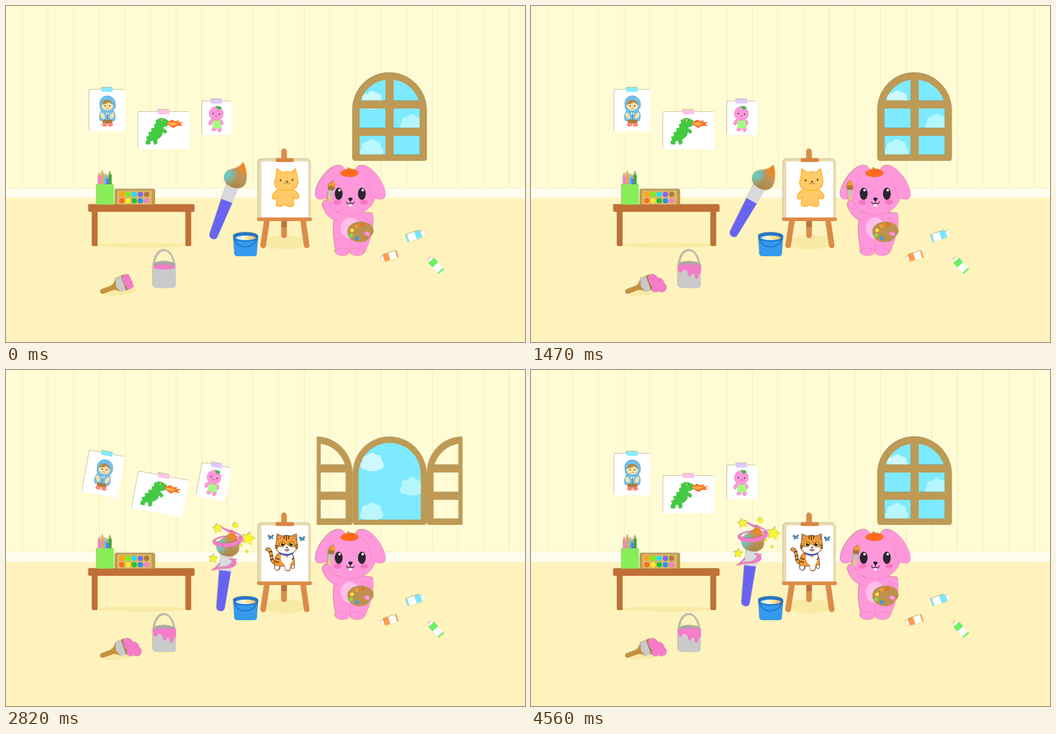
An HTML page that plays this animation: 929 by 603 pixels, repeating every 4.59 s.

```html
<!DOCTYPE html>
<html lang="en">
<head>
<meta charset="utf-8">
<title>Art room</title>
<style>
html,body{margin:0;width:100%;height:100%;overflow:hidden;background:#fffbd5}
svg{display:block;width:100vw;height:100vh}
.s{filter:drop-shadow(-1px -.3px .5px rgba(100,90,40,.38))}
.line{fill:none;stroke-linecap:round;stroke-linejoin:round}
.pink{fill:#ff98da;stroke:#ef7cc6;stroke-width:.8}
.dark{stroke:#2b2430}
</style>
</head>
<body>
<svg viewBox="0 0 929 603" preserveAspectRatio="none">
<defs>
  <linearGradient id="tuft" x1=".7" y1="0" x2=".5" y2="1">
    <stop offset="0" stop-color="#ff7a12"/><stop offset=".28" stop-color="#e88b2c"/>
    <stop offset=".5" stop-color="#bd965c"/><stop offset="1" stop-color="#ab8443"/>
  </linearGradient>
  <radialGradient id="teal" cx=".1" cy=".62" r=".52">
    <stop offset="0" stop-color="#4fd6d8"/><stop offset=".45" stop-color="#7dbcae" stop-opacity=".85"/>
    <stop offset="1" stop-color="#a89a66" stop-opacity="0"/>
  </radialGradient>
  <linearGradient id="water">
    <stop offset="0" stop-color="#9fdcf0"/><stop offset=".35" stop-color="#fff8d8"/>
    <stop offset=".75" stop-color="#ffd68a"/><stop offset="1" stop-color="#e9b060"/>
  </linearGradient>
  <clipPath id="opening"><path id="hole" d="M631 187A55.5 56 0 0 1 742.5 187V268.5H631Z"/></clipPath>
  <path id="door" fill="#be9a55" fill-rule="evenodd" d="M66.5 120A66.5 67 0 0 0 0 187V273Q0 278 5 278H66.5ZM59.5 132.5A55 55 0 0 0 14 170H59.5ZM12.5 184H59.5V219H12.5ZM12.5 233H59.5V267H12.5Z"/>
  <g id="cloud"><circle cy="-8" r="9"/><circle cx="-10" cy="-4" r="8"/><circle cx="9" cy="-5" r="8"/><circle cx="-13" cy="6" r="8"/><circle cx="13" cy="5" r="8"/><circle cx="-3" cy="6" r="10.5"/><circle cx="6" cy="7" r="9"/></g>
  <path id="ear" d="M607 295C604 284 591 283 578 294C564 306 553 327 554 340C555 349 567 348 575 343C581 339 581 328 583 320C586 310 592 302 600 298"/>
  <g id="tube">
    <rect x="-16" y="-7" width="18" height="14" rx="1" fill="#fff"/>
    <path d="M-16.500-7H-13.500V7H-16.500ZM0-7H9Q11-6 11 0Q11 6 9 7H0Z"/>
    <rect x="11" y="-4" width="5" height="8" rx="1" fill="#fff"/>
  </g>
  <g id="fly" fill="#4d93bd" stroke="#27587a" stroke-width=".7"><path d="M0 0C-6-7-7 1-2 2C-6 5-1 7 0 2C4 6 6 3 2 1C7-1 5-7 0 0Z"/></g>
  <path id="tip" d="M-11-26C-23-33-23-46-13-53C-5-59 0-63 3-73C11-66 21-51 20-38C18-27 6-21-11-26Z"/>
</defs>

<!-- room -->
<rect width="929" height="603" fill="#fffbd5"/>
<g id="stripes" stroke="#f5efa6" stroke-width="1.1"></g>
<rect y="326" width="929" height="18.5" fill="#fffdee"/>
<path d="M0 326.3H929" stroke="#f6f0bb"/>
<rect y="344.5" width="929" height="258.5" fill="#fff3bd"/>
<g fill="#f8eaa5">
  <ellipse cx="500" cy="424" rx="38" ry="13"/><ellipse cx="617" cy="438" rx="32" ry="10"/><ellipse cx="243" cy="429" rx="84" ry="4.500"/>
  <ellipse cx="204" cy="513" rx="31" ry="6" transform="rotate(-7 204 513)"/><ellipse cx="285" cy="504" rx="19" ry="4"/>
  <ellipse cx="429" cy="446" rx="20" ry="4"/><ellipse cx="733" cy="418" rx="15" ry="4" transform="rotate(-18 733 418)"/>
  <ellipse cx="686" cy="455" rx="15" ry="4" transform="rotate(-15 686 455)"/>
</g>

<!-- window -->
<g class="s">
  <path d="M621 187A66 67 0 0 1 753 187V273Q753 278 748 278H626Q621 278 621 273Z" fill="#be9a55"/>
  <use href="#hole" fill="#7deaff"/>
  <g clip-path="url(#opening)">
    <use href="#cloud" id="c1" fill="#cdf8fd"/><use href="#cloud" id="c2" fill="#b3f6fd"/><use href="#cloud" id="c3" fill="#b9f7fe"/>
  </g>
</g>
<g class="s"><use href="#door" id="doorL"/><use href="#door" id="doorR"/></g>

<!-- pinned drawings -->
<g class="paper s" data-x="181" data-y="150">
  <rect x="149" y="150" width="64.500" height="75" rx="3" fill="#fff"/>
  <rect x="171" y="146" width="20" height="8" fill="#86ebff"/>
  <path d="M168 177C166 156 196 156 196 177C197 183 192 186 192 187C197 195 196 201 194 206H169C166 201 167 195 171 187C169 185 168 182 168 177Z" fill="#6fc0ea" stroke="#4b9dcb" stroke-width=".8"/>
  <rect x="173" y="204" width="17.500" height="7" rx="2" fill="#a97b3c"/>
  <ellipse cx="181.500" cy="179" rx="10.500" ry="8.500" fill="#ffe0a8"/>
  <path d="M171 178C172 165 190 165 192 178C188 175 186 173 183 173C178 177 174 175 171 178Z" fill="#b38a48"/>
  <circle cx="177.500" cy="179" r="1"/><circle cx="185.500" cy="179" r="1"/>
  <path class="line" d="M180 183.500H183M181.500 190V204" stroke="#8d633a" stroke-width=".9"/>
  <ellipse cx="173" cy="197" rx="3.500" ry="6" fill="#ffe0a8" transform="rotate(-25 173 197)"/><ellipse cx="190" cy="197" rx="3.500" ry="6" fill="#ffe0a8" transform="rotate(25 190 197)"/>
  <path d="M179 191l4 2-4 2M184 191l-4 2 4 2" fill="#fff"/>
  <ellipse cx="176.500" cy="213" rx="4.800" ry="3.500" fill="#ff8577"/><ellipse cx="187" cy="213" rx="4.800" ry="3.500" fill="#ff8577"/>
</g>
<g class="paper s" data-x="282" data-y="190">
  <rect x="236.500" y="190" width="92" height="67" rx="3" fill="#fff"/>
  <rect x="272" y="186" width="20.500" height="8" fill="#ffc3e4"/>
  <path d="M284 211L297 204 303 207 310 205 308 209 317 208 312 212 317 215 306 215 300 219 293 215Z" fill="#ff6c20"/>
  <path d="M286 211L299 208 309 211 300 215Z" fill="#ffb04a"/>
  <path d="M269 209C270 201 279 200 285 203L291 206L289 209H285L290 213C288 217 283 216 280 219C284 221 288 223 288 226L285 229 280 225C281 232 276 237 270 239L271 246 266 249 263 241 258 243 258 248H251L250 244L253 239C256 230 262 222 267 216Z" fill="#42cb42" stroke="#2da835" stroke-width=".6" stroke-linejoin="round"/>
  <g fill="#42cb42"><circle cx="270" cy="206" r="2.200"/><circle cx="267" cy="214" r="2.200"/><circle cx="262" cy="221" r="2.200"/><circle cx="257" cy="228" r="2.200"/><circle cx="253" cy="236" r="2.200"/></g>
  <circle cx="280" cy="205" r="2" fill="#ffef60"/><circle cx="281" cy="205" r=".9"/>
</g>
<g class="paper s" data-x="377" data-y="171">
  <rect x="351" y="171" width="53" height="60.500" rx="3" fill="#fff"/>
  <rect x="367" y="167" width="20" height="8" fill="#dec9ff"/>
  <path d="M368 203C362 206 361 214 366 214L372 207ZM385 204C389 206 390 213 386 214L381 208Z" class="pink"/>
  <path d="M371 217L368 222Q371 227 376 222L377 218L381 226Q387 226 385 216Z" class="pink"/>
  <path d="M371 204H383L386 218Q377 222 369 218Z" fill="#a6fb82"/>
  <ellipse cx="376.500" cy="193" rx="12.500" ry="12.500" class="pink"/>
  <path d="M377 182C373 180 379 178 380 180C383 179 384 180 386 183C382 187 379 187 377 182Z" fill="#46b843"/>
  <circle cx="371" cy="193" r="1.100"/><circle cx="382" cy="194" r="1.100"/>
  <path class="line" d="M375 197Q376.500 199 378 197" stroke="#663355"/>
</g>

<!-- table -->
<g id="table" class="s">
  <path d="M154 366H164V429Q164 431 162 431H156Q154 431 154 429ZM321.500 366H331.500V429Q331.500 431 329 431H324Q321.500 431 321.500 429Z" fill="#c07036"/>
  <rect x="147.500" y="356" width="190" height="13.500" rx="2" fill="#c07036"/>
  <g id="pencils"></g>
  <rect x="162" y="320" width="31" height="36.500" rx="1.500" fill="#88ee58"/>
  <rect x="195" y="328.500" width="72" height="28" rx="2.500" fill="#c3994c"/><rect x="199" y="331" width="62" height="25" rx="2" fill="#d8b866"/>
  <g id="paints"></g>
</g>

<!-- easel -->
<g class="s">
  <g class="line" stroke="#dd8b47" stroke-width="9.500">
    <path d="M498 261V275M467 388L460.500 430M532.500 388L538.500 430"/><path d="M498 384V412"/>
  </g>
  <path d="M493.300 386H502.700V397H493.300Z" fill="#b9733c"/>
  <rect x="451" y="274.500" width="95" height="109" rx="7" fill="#e9dab0"/>
  <rect x="457" y="279" width="84" height="103" rx="3" fill="#fff"/>
  <rect x="482.500" y="273.500" width="33" height="6.500" rx="3" fill="#d98542"/>
  <rect x="450" y="379.500" width="97.500" height="6.500" rx="2.500" fill="#dd8b47"/>
</g>
<g id="plain" fill="#ffca68" stroke="#ffb735" stroke-width="2" stroke-linejoin="round">
  <path d="M488 329C480 333 475 341 478 346C481 348 484 345 486 343C484 351 482 358 487 359C494 361 497 357 499 356C505 361 513 361 515 357L514 343C518 348 525 346 524 340C522 334 517 331 512 329Z"/>
  <path d="M483 308L485 292L494 299Q503 296 511 299L518 292L521 306C525 318 522 331 502 331C482 331 478 321 483 308Z"/>
  <g fill="#8a622c" stroke="none"><circle cx="491.500" cy="313" r="2"/><circle cx="513" cy="312" r="2"/><ellipse cx="503" cy="315" rx="2.400" ry="1.600"/></g>
  <path class="line" d="M498 318Q501 321 503 317Q506 321 508 318" stroke="#8a622c" stroke-width="1"/>
</g>
<g id="tiger" stroke="#3f2a1c" stroke-width=".8" stroke-linejoin="round">
  <path class="line" d="M483 346C473 346 477 332 473 326Q470 320 467.500 322" stroke-width="6"/><path class="line" d="M483 346C473 346 477 332 473 326Q470 320 467.500 322" stroke="#f49a35" stroke-width="4.500"/>
  <path class="line" d="M471 327L476 325M473 334L477 333M474 341L478 339" stroke-width="1.600"/>
  <path d="M488 328C480 335 480 345 481 354C480 360 488 361 490 357L491 352H499L500 359C504 362 509 361 509 357L510 354C513 358 517 357 516.500 352C516.500 344 516 335 512 328Z" fill="#f49a35"/>
  <path d="M493 331C490 340 494 347 499 349L500 358C504 360 508 359 508 356L509 348C514 343 514 336 512 330Z" fill="#fff" stroke="none"/>
  <path d="M481 353C480 360 488 361 489 356L490 352C487 350 483 350 481 353ZM511 350V355C514 358 517 356 516.500 350Z" fill="#fff"/>
  <path d="M484 309L485 294L494 298Q502 295 510 298L520 294L521 310C525 321 516 330.500 502 330.500C487 330.500 479 321 484 309Z" fill="#f49a35"/>
  <path d="M487 304V297L492 301ZM518 304V298L513 301Z" fill="#ffc8b0" stroke-width=".6"/>
  <path d="M485 319C488 317 495 319 501 313C507 318 515 317 519 319C518 326 512 330 502 330C492 330 487 326 485 319Z" fill="#fff" stroke="none"/>
  <g class="line" stroke-width="1.500"><path d="M498 298V303M502 296.500V305M506 298V303M483 315L487 316M482 319L486 319M521 314L518 315M522 319L518 319M484 338L489 340M482 344L488 345M515 337L512 340"/></g>
  <g fill="#f7e34f"><circle cx="494" cy="313" r="4.600"/><circle cx="511" cy="313" r="4.600"/></g>
  <g fill="#1c1512" stroke="none"><circle cx="495" cy="313" r="2.800"/><circle cx="510.500" cy="313" r="2.800"/><path d="M500.500 317.500H505.500L503 320Z"/></g>
  <circle cx="496" cy="311.500" r="1.100" fill="#fff" stroke="none"/><circle cx="511.500" cy="311.500" r="1.100" fill="#fff" stroke="none"/>
  <path d="M499 322Q501 323.500 503 321Q505 323.500 507 322C506 326 500 326 499 322Z" fill="#ef7f7f" stroke-width=".8"/>
  <path class="line" d="M491 329Q502 335 513 329" stroke="#3c57c9" stroke-width="2.800"/>
  <circle cx="503" cy="334.500" r="1.600" fill="#ffd84a" stroke-width=".5"/>
  <use href="#fly" x="474" y="299"/><use href="#fly" x="530" y="302"/>
</g>

<!-- bucket -->
<g class="s">
  <path d="M407 413H451.500L449 445Q448.500 449 444 449H414Q409.500 449 409 445Z" fill="#349aee"/>
  <ellipse cx="429" cy="413" rx="22.500" ry="7" fill="#2576c6"/>
  <path d="M407 413Q408 420 429 421Q450 420 451.500 413L451 420Q429 426 407.500 420Z" fill="#2576c6"/>
  <ellipse cx="429" cy="416" rx="18" ry="4" fill="url(#water)"/>
  <path class="line" d="M409 419C415 437 441 437 449 419" stroke="#2576c6" stroke-width="2.200"/>
</g>

<!-- paint can -->
<g class="s">
  <path class="line" d="M264.500 470C266 428 300 428 302.500 470" stroke="#bdbdb8" stroke-width="3"/>
  <path d="M263 464Q283 452 304 464V500Q304 506 297 506H270Q263 506 263 500Z" fill="#cacaca"/>
  <ellipse cx="283.500" cy="464.500" rx="19.500" ry="6" fill="#a9a7a6"/>
  <ellipse cx="283.500" cy="468.500" rx="19.500" ry="4.500" fill="#f47cc8"/>
  <path id="drip" fill="#f47cc8"/>
</g>

<!-- flat brush -->
<g class="s">
  <path d="M171 509L188 502.500Q194 499 196 490L205 513Q198 508 191 510L174 516.500Q169 517 169 513Q169 510 171 509Z" fill="#c78f3d"/>
  <path d="M196 489L206 485 215 510 205 514Q202 508 197 504Z" fill="#c9c9c9"/>
  <path d="M206 485L212 482 222 507 215 511Z" fill="#a97f3e"/>
  <path d="M210 484L219 481Q226 492 229 504L219 509Q217 501 213 499Q209 490 210 484Z" fill="#f47cc8"/>
  <g id="blob" fill="#f47cc8"></g>
</g>

<!-- tubes -->
<g class="s">
  <use href="#tube" fill="#79e6ff" transform="translate(733 412)rotate(-19)"/>
  <use href="#tube" fill="#ff9a50" transform="translate(686 449.500)rotate(163)scale(.95)"/>
  <use href="#tube" fill="#69f266" transform="translate(768.500 464.500)rotate(228)scale(.98)"/>
</g>

<!-- dog -->
<g class="s">
  <path class="pink" d="M594 366C583 386 585 414 591 440H643C650 425 661 398 656 372Z"/>
  <ellipse cx="616" cy="399" rx="17" ry="19" fill="#ffbfe9"/>
  <ellipse cx="602" cy="441" rx="12.500" ry="7" class="pink"/><ellipse cx="629" cy="441" rx="13" ry="7" class="pink"/>
  <path class="line" d="M616.500 422V440M640 380Q650 384 653 393" stroke="#ef7cc6"/>
  <path d="M611 405C611 391 627 386 638 387C653 388 661 400 657 408C655 413 651 412 650 416C647 424 634 425 626 423C616 420 611 412 611 405Z" fill="#bd914f"/>
  <path class="pink" d="M641 408C642 403 651 405 652 409C651 414 645 414 641 408Z"/>
  <g id="dabs"></g>
</g>
<g id="head" class="s">
  <ellipse class="pink" cx="617" cy="335" rx="45" ry="40"/>
  <use href="#ear" class="pink"/><use href="#ear" class="pink" transform="matrix(-1 0 0 1 1233 0)"/>
  <ellipse cx="593" cy="352" rx="7" ry="4.500" fill="#f578c0"/><ellipse cx="641" cy="352" rx="7" ry="4.500" fill="#f578c0"/>
  <path d="M598 301C600 290 631 290 631 300C629 309 603 309 598 301Z" fill="#ff6a1e"/><path class="line" d="M613.500 294V291.500" stroke="#ff6a1e" stroke-width="3"/>
  <g id="open"><ellipse cx="595.500" cy="337" rx="7" ry="11" fill="#2b2430"/><ellipse cx="637" cy="337" rx="7" ry="11" fill="#2b2430"/><circle cx="597" cy="330.500" r="2.300" fill="#fff"/><circle cx="638.500" cy="330.500" r="2.300" fill="#fff"/></g>
  <path id="shut" class="line dark" d="M590 331L603 338 590 344M645 331L631 338 645 344" stroke-width="2"/>
  <path d="M612.500 345Q616.500 342.500 620.500 345Q620 349 616.500 350Q613 349 612.500 345Z" fill="#2b2430"/>
  <path d="M613 355H620V358Q616.500 362 613 358Z" fill="#fff"/>
  <path class="line dark" d="M609.500 352Q612 357 616.500 354Q621 357 623.500 352M616.500 350V354" stroke-width="1.500"/>
</g>
<g class="s">
  <path class="line" d="M593 378Q581 375 574 358" stroke="#ef7cc6" stroke-width="15.500"/><path class="line" d="M595 378Q581 375 574 358" stroke="#ff98da" stroke-width="14"/>
  <g id="hand">
    <path d="M-2.500 2L-3-22H3.500L3 2Q0 5-2.500 2Z" fill="#e3c68a"/><rect x="-4" y="-32" width="8" height="10" fill="#c8c3b6"/>
    <path d="M-4-32C-8-39-4-44 2-49C7-43 8-37 4-32Z" fill="#a57b3d"/><path d="M-6-38C-4-44-1-45 2-49C6-44 6-42 6.500-38Q0-42-6-38Z" fill="#ff9a1f"/>
  </g>
  <path class="pink" d="M567 357C566 350 573 347 578 351C581 356 578 363 573 364Q568 363 567 357Z"/>
</g>

<!-- big brush -->
<g id="back" class="line" stroke="#e08fd8" stroke-width="3.500"><path d="M387 283C400 291 419 291 423 302M372 308C376 298 400 296 423 301M374 358C383 340 400 343 411 340"/></g>
<g id="brush" class="s">
  <path d="M-10.500 1H10.500L7.500 68Q7 75 0 75Q-7 75-7.500 68Z" fill="#6864f2"/>
  <path d="M-11-27H11.500L10.500 2H-10.500Z" fill="#dadadd"/>
  <use href="#tip" fill="url(#tuft)"/><use href="#tip" fill="url(#teal)"/>
</g>
<g id="front">
  <g fill="#f47cc8" class="s">
    <path d="M370 309C373 302 378 303 376 307C386 314 414 312 421 298Q425 298 424 306C414 322 373 322 370 309Z"/>
    <path d="M367 361C377 349 391 358 402 349C408 344 405 341 399 340C408 336 415 342 412 349C403 361 384 353 367 361Z"/>
    <path d="M387 282Q398 292 410 290L408 293Q394 293 387 282Z"/>
  </g>
  <g id="stars" class="s" fill="#f7f531" stroke="#dcd62d" stroke-width=".7" stroke-linejoin="round"></g>
</g>
</svg>

<script>
const $ = id => document.getElementById(id);
const LOOP = 4590, TAU = Math.PI * 2;
const dots = (id, list, r) => $(id).innerHTML = list.map(([x, y, c]) => `<circle cx="${x}" cy="${y}" r="${r}" fill="${c}"/>`).join('');

let lines = '';
for (let i = 0; i < 20; i++) lines += `M${29.2 + 45.87 * i} 0V326`;
$('stripes').innerHTML = `<path d="${lines}"/>`;

const paints = ['#ffa310', '#72f216', '#25dcf5', '#8268ee', '#ad7b3d', '#ff6b20', '#f9ee27', '#1fc62f', '#3090f0', '#f77dcb'];
dots('paints', paints.map((c, i) => [207.3 + i % 5 * 11.1, i < 5 ? 338 : 349.5, c]), 4.8);
dots('dabs', [[619.5, 402.5, '#ffe52e'], [628, 395, '#ff9a25'], [638.5, 392.5, '#ff6420'], [618, 411.5, '#69ee42'], [628, 417, '#339cf1']], 3.2);

const pencils = [[167.5, 299, '#f780cb'], [173, 295, '#e0a958'], [178.5, 300, '#43cdec'], [182, 303, '#8268ee'], [186.5, 296, '#3bab35']];
$('pencils').innerHTML = pencils.map(([x, y, c]) =>
  `<path d="M${x - 2.6} 322V${y + 7}L${x} ${y}L${x + 2.6} ${y + 7}V322Z" fill="${c}"/><path d="M${x - 2.6} ${y + 7}L${x} ${y + 1}L${x + 2.6} ${y + 7}Z" fill="#e9b878" opacity=".7"/>`).join('');

function star(r, turn) {
  let p = '';
  for (let i = 0; i < 10; i++) {
    const a = turn + i * TAU / 10, k = i % 2 ? r * .52 : r;
    p += `${(k * Math.sin(a)).toFixed(1)},${(-k * Math.cos(a)).toFixed(1)} `;
  }
  return `<polygon points="${p}"/>`;
}
const sparks = [[379, 284, 9, -.2], [434, 302.5, 12.5, .25], [371.5, 338.5, 8.5, .1], [411, 279, 4.5], [420, 314.5, 2.4], [432, 326.5, 2.2]];
$('stars').innerHTML = sparks.map(([, , r, a]) => `<g>${a === undefined ? `<circle r="${r}"/>` : star(r, a)}</g>`).join('');

const blobs = [[214, 489, 219, 490, 6, 8], [218, 496, 228, 499, 7, 11], [222, 502, 234, 505, 5, 9], [220, 505, 223, 507, 4, 7]];
$('blob').innerHTML = '<circle/>'.repeat(blobs.length);

const mix = (a, b, p) => a + (b - a) * p;
const clamp = p => Math.min(1, Math.max(0, p));
const ease = (t, a, b) => { const p = clamp((t - a) / (b - a)); return p * p * (3 - 2 * p); };
// Eased path through [time, value] pairs
function keys(t, ...k) {
  let v = k[0][1];
  for (let i = 1; i < k.length; i++) v += (k[i][1] - k[i - 1][1]) * ease(t, k[i - 1][0], k[i][0]);
  return v;
}
const put = (el, v) => el.setAttribute('transform', v);
const show = (id, v) => $(id).style.opacity = v;

function doorOpen(t) {
  if (t < 2835) {
    const p = clamp((t - 1890) / 945);
    return p < .5 ? 2 * p * p : 1 - 2 * (1 - p) ** 2;
  }
  return (1 - clamp((t - 2835) / 965)) ** 2;
}

function dripPath(p) {
  const y = (a, b) => (a + b * p).toFixed(1);
  return `M263 465Q283 462 304.500 465V${y(470, 5)}C304 ${y(471, 11)} 301 ${y(471, 11)} 300 ${y(471, 9)}` +
    `C300 ${y(472, 21)} 293 ${y(472, 21)} 292 ${y(472, 9)}C291 ${y(471, 9)} 288 ${y(471, 9)} 287 ${y(471, 11)}` +
    `C286 ${y(472, 15)} 281 ${y(472, 15)} 280 ${y(471, 6)}C276 ${y(471, 2)} 272 ${y(471, 2)} 271 ${y(471, 5)}` +
    `C269 ${y(471, 9)} 264 ${y(471, 8)} 263 ${y(469, 3)}Z`;
}

function draw(t) {
  const ph = TAU * t / 1545;
  put($('c1'), `translate(655.500 ${167.5 + 4 * Math.sin(ph + .5)})`);
  put($('c2'), `translate(726 ${207.5 + 3.5 * Math.cos(ph)})`);
  put($('c3'), `translate(654.500 ${253 + 3 * Math.cos(ph)})`);

  const sx = 1 - 1.96 * doorOpen(t);
  put($('doorL'), `translate(620.500)scale(${sx} 1)`);
  put($('doorR'), `translate(753.500)scale(${-sx} 1)`);

  const sway = keys(t, [1950, 0], [2600, 11], [2850, 10.5], [3500, -7], [4050, 4.5], [4570, 0]);
  for (const el of document.querySelectorAll('.paper')) put(el, `rotate(${sway} ${el.dataset.x} ${el.dataset.y})`);
  put($('table'), `rotate(${keys(t, [1980, 0], [2130, 1.2], [2300, -1], [2460, .5], [2600, 0])} 243 395)`);

  const pour = ease(t, 0, 1400);
  $('drip').setAttribute('d', dripPath(pour));
  show('drip', clamp(pour * 40));
  const spread = ease(t, 540, 1400);
  [...$('blob').children].forEach((c, i) => {
    const [x0, y0, x1, y1, r0, r1] = blobs[i];
    c.setAttribute('cx', mix(x0, x1, spread));
    c.setAttribute('cy', mix(y0, y1, spread));
    c.setAttribute('r', mix(r0, r1, spread));
  });

  const nod = t < 1470 ? 1 - Math.cos(TAU * t / 1470) : 0;
  put($('head'), `translate(${nod * .4} ${nod * 1.2})`);
  const wave = keys(t, [0, 11], [300, -2], [600, 11], [900, -1], [1200, 11], [1500, -1], [1800, 11]);
  put($('hand'), `translate(${mix(571, 575, (wave + 1) / 12)} 362)rotate(${wave})`);
  const squint = t >= 1770 && t < 2460;
  show('open', squint ? 0 : 1);
  show('shut', squint ? 1 : 0);

  const tilt = keys(t, [100, 21], [900, 62], [950, 61], [1680, 21], [1900, 7]);
  const bx = mix(396, 392.5, ease(t, 1680, 1900));
  const lift = -9 * ease(t, 3200, 4320);
  const by = keys(t, [1680, 348], [1850, 372], [2080, 358.5]) + lift;
  put($('brush'), `translate(${bx} ${by})rotate(${tilt})`);

  const magic = ease(t, 1820, 2080), drawn = ease(t, 1740, 1880);
  for (const id of ['back', 'front']) {
    put($(id), `translate(0 ${by - 358.5})`);
    show(id, magic);
  }
  [...$('stars').children].forEach((g, i) => {
    const [x, y] = sparks[i];
    put(g, `translate(${mix(398, x, magic)} ${mix(325, y, magic)})scale(${magic})`);
  });
  show('tiger', drawn);
  show('plain', 1 - drawn);
}

const start = performance.now();
function tick() {
  draw((performance.now() - start) % LOOP);
  requestAnimationFrame(tick);
}
draw(0);
requestAnimationFrame(tick);
</script>
</body>
</html>
```
